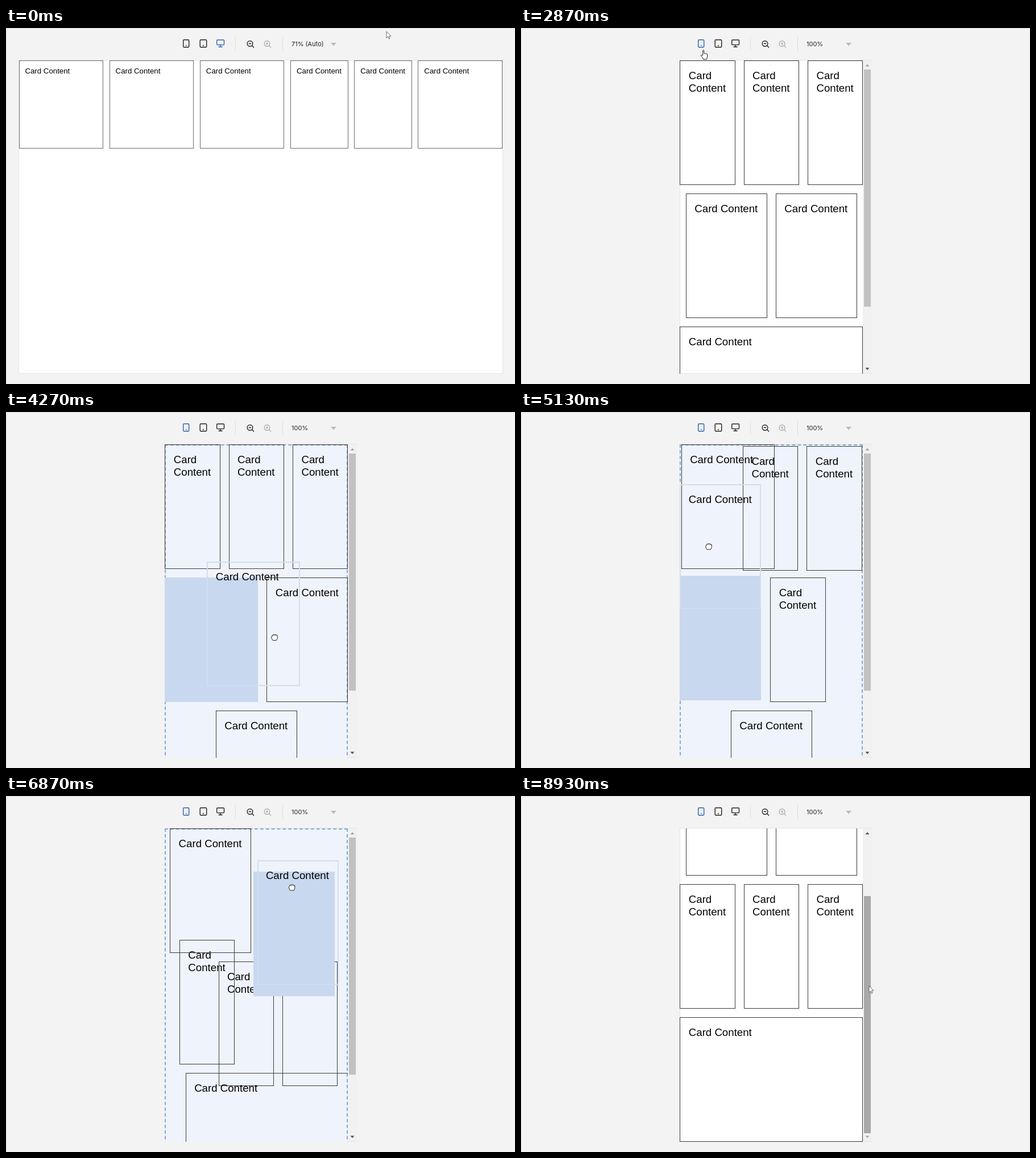
Animation, 895 px wide and 626 px high, one loop 9 s. Source, as an HTML page:

```html
<!DOCTYPE html>
<html lang="en">
<head>
<meta charset="utf-8">
<title>Responsive cards</title>
<style>
html, body { margin: 0; width: 100%; height: 100%; overflow: hidden; background: #f3f3f3; }
#stage { position: absolute; left: 0; top: 0; width: 895px; height: 626px; overflow: hidden; background: #f3f3f3; }
#stage * { box-sizing: border-box; }
#edge { position: absolute; inset: 0; border: solid #dfdfdf; border-width: 1px 0 0 1px; }
svg { position: absolute; left: 0; top: 0; overflow: visible; }
#zoom { position: absolute; left: 502px; top: 20px; font: 11px/16px Inter, sans-serif; color: #222; white-space: nowrap; }
#frame { position: absolute; top: 56px; height: 552px; background: #fff; border: 1px solid #e4e4e4; }
#view { position: absolute; top: 57px; height: 551px; overflow: hidden; }
#zone { position: absolute; left: 0; top: 0; width: 322px; height: 687px; background: #eff3fb; }
#dash { position: absolute; inset: 0; border: 2px dashed #82a9da; }
.card { position: absolute; border: 1px solid #3a3a3a; font-family: "Liberation Sans", Arial, sans-serif; color: #000; }
.card span { display: block; }
#ghost { border-color: #d0dfee; border-width: 2px; }
#pick { position: absolute; border: 2px solid #86abd8; }
#menu { position: absolute; width: 139px; height: 34px; border-radius: 6px; background: #1a1a1a; color: #ddd; }
#menu b { position: absolute; left: 34px; top: 9px; font: 600 11px/16px Inter, sans-serif; }
#bar { position: absolute; left: 601px; top: 57px; width: 16px; height: 550px; background: #f1f1f1; }
#thumb { position: absolute; left: 2px; width: 12px; height: 417px; }
</style>
</head>
<body>
<div id="stage">
  <div id="edge"></div>
  <svg id="tools" width="895" height="56" fill="none" stroke="#222" stroke-width="1.4">
    <g id="phone"><rect x="311.7" y="20.7" width="10" height="13" rx="1.5"/><path d="M316 31h1.5"/></g>
    <g id="tablet"><rect x="341.2" y="20.7" width="11.5" height="13" rx="1.5"/><path d="M346 31h2"/></g>
    <g id="desktop"><rect x="370.7" y="21" width="12.8" height="8.6" rx="1"/><path d="M377 30v3M373.6 33.2h7"/></g>
    <path d="M403.5 16v24M486.5 16v24" stroke="#dcdcdc" stroke-width="1"/>
    <g><circle cx="429" cy="27.5" r="4.8"/><path d="M432.6 31l3.4 3.6M426.8 27.5h4.4"/></g>
    <g stroke="#b0b0b0"><circle cx="459" cy="27.5" r="4.8"/><path d="M462.6 31l3.4 3.6M456.8 27.5h4.4M459 25.3v4.4"/></g>
    <path d="M571 26h10l-5 5.4z" fill="#b9b9b9" stroke="none"/>
  </svg>
  <div id="zoom"></div>
  <div id="frame"></div>
  <div id="view"><div id="zone"><div id="dash"></div></div></div>
  <div id="bar">
    <div id="thumb"></div>
    <svg width="16" height="550"><path id="up" d="M4.5 10.5h7L8 6.5z"/><path id="down" d="M4.5 540.5h7L8 544.5z"/></svg>
  </div>
  <div id="pick"></div>
  <div id="menu">
    <b>Card</b>
    <svg width="139" height="34" fill="none" stroke="#d0d0d0" stroke-width="1.2">
      <path d="M14.5 15l3-3.5 3 3.5M17.5 12v8q0 2 2 2h4"/>
      <path d="M70.5 4v26" stroke="#555"/>
      <rect x="87.5" y="14.5" width="9" height="9" rx="1.5"/>
      <path d="M85.5 19.5h-1.5q-1 0-1-1v-7q0-1 1-1h7.5q1 0 1 1v1.5"/>
      <path d="M114 13.5h12M117.5 13.5v-2h5v2M115.5 13.5l.6 10h7.8l.6-10M118.500 16v5M121.5 16v5"/>
    </svg>
  </div>
  <svg width="895" height="626"><path id="cursor" fill="#fff" stroke-linejoin="round"/></svg>
</div>
<script>
const LOOP = 9000, TOP = 57, ROW = 219, GAP = 15, FLIP = 200, BLUE = '#2b62b5';
const $ = id => document.getElementById(id);
const clamp = v => Math.max(0, Math.min(1, v));
const mix = (a, b, k) => a + (b - a) * k;
const px = v => v + 'px';

const devices = {
  desktop: { x: 22.5, w: 850.5, s: .71, line: '#6c6c6c' },
  tablet: { x: 88, w: 720, s: 1, line: '#3a3a3a' },
  phone: { x: 279.4, w: 322, s: 1, line: '#3a3a3a' }
};

// Each drag: card, press, reorder and drop times, resulting order.
const drags = [
  { card: 'F', from: 3170, swap: 3462, drop: 3760, order: 'ABFCDE' },
  { card: 'C', from: 4080, swap: 4390, drop: 4560, order: 'ABFDCE' },
  { card: 'D', from: 4900, swap: 5130, drop: 5400, order: 'DABFCE' },
  { card: 'F', from: 5650, swap: 5780, drop: 6000, order: 'DABCFE' },
  { card: 'E', from: 6500, swap: 6780, drop: 7050, order: 'DEABCF' },
  { card: 'D', from: 7250, swap: 7400, drop: 7600, order: 'EDABCF' }
];

// time, x, y
const path = [
  [0, 669, 6], [250, 535, 62], [560, 349, 30], [1650, 349, 30], [1920, 321, 29], [2850, 321, 29],
  [3130, 301, 592], [3170, 301, 592], [3600, 401, 175], [3760, 470, 165], [4060, 398, 424],
  [4090, 398, 424], [4270, 472, 396], [4450, 552, 400], [4560, 556, 400], [4870, 330, 400],
  [4910, 330, 400], [5250, 330, 172], [5400, 330, 168], [5630, 430, 396], [5660, 430, 396],
  [5920, 532, 401], [6120, 532, 401], [6470, 430, 572], [6510, 430, 572], [6940, 508, 130],
  [7050, 508, 128], [7230, 301, 196], [7260, 301, 196], [7540, 458, 195], [7780, 458, 195],
  [8130, 660, 255], [8420, 612, 231], [8480, 612, 231], [8860, 612, 334], [9000, 612, 334]
];

const shapes = {
  arrow: 'M0 0V11.5L2.6 9 4.4 13.2 6.2 12.4 4.5 8.3H8Z',
  point: 'M-1 10V1.5Q0 0 1 1.5V6.5Q2.3 5.6 3.2 7Q4.5 6.2 5.3 7.6Q7 7 7 9V12Q7 14 5.5 17H0Q-1 14-4 11Q-4.5 9-2.8 9.5Z',
  open: 'M-3 6Q-4 3-6.5 0Q-6-1.7-4.2-.2L-5-4.5Q-4-6-3-4.5L-2-1.5-1.8-6Q-.8-7.2.2-6L.4-1.5 1.4-5.7Q2.6-6.7 3.4-5.2L3-1 4.6-3.6Q6-4.3 6.4-2.8Q5.6 2 4 6Z',
  fist: 'M-3 5.5Q-5.5 2-5.3-1Q-4.6-2.4-3.6-1.6V-3.6Q-2.4-5-1-4.2Q.4-5.4 1.6-4.2Q3-5 4-3.4Q5.6-3.4 5.4-1.2Q5.5 3 3.6 5.5ZM-1-4V-2.5M1.6-4V-2.5M4-3.2V-2'
};

// Wrapping rows: D and E keep their width, the others share the free space.
function flow(order, { w, s }) {
  const full = w / s, out = {}, rows = [[]];
  const fixed = c => 'DE'.includes(c);
  const base = c => fixed(c) ? 143 : 97;
  const used = row => row.reduce((n, c) => n + base(c) + GAP, -GAP);
  for (const c of order) {
    if (used([...rows.at(-1), c]) > full) rows.push([]);
    rows.at(-1).push(c);
  }
  rows.forEach((row, i) => {
    const free = full - used(row), grow = row.filter(c => !fixed(c)).length;
    let x = grow ? 0 : free / 2;
    for (const c of row) {
      const cw = base(c) + (fixed(c) ? 0 : free / grow);
      out[c] = { x: x * s, y: i * (ROW + GAP) * s, w: cw * s };
      x += cw + GAP;
    }
  });
  return out;
}

function makeCard(id) {
  const el = document.createElement('div');
  el.className = 'card';
  el.id = id;
  el.innerHTML = '<span>Card Content</span>';
  $('view').append(el);
  return el;
}
const cards = Object.fromEntries([...'ABCDEF'].map(c => [c, makeCard(c)]));
const ghost = makeCard('ghost');

function place(el, { x, y, w }, s = 1) {
  const line = el === ghost ? 2 : 1;
  Object.assign(el.style, {
    left: px(x), top: px(y), width: px(w), height: px(ROW * s),
    padding: `${16 * s - line}px ${8 * s - line}px 0 ${15.4 * s - line}px`,
    fontSize: px(18.67 * s), lineHeight: px(21.7 * s)
  });
}

const show = (el, on) => el.style.display = on ? 'block' : 'none';

function pointer(t) {
  const i = Math.max(1, path.findIndex(p => p[0] > t));
  const [a, b] = [path[i - 1], path[i]];
  const p = clamp((t - a[0]) / (b[0] - a[0]));
  const k = p * p * (3 - 2 * p);
  return [mix(a[1], b[1], k), mix(a[2], b[2], k)];
}

function render(t) {
  const name = t < 960 ? 'desktop' : t < 2100 ? 'tablet' : 'phone';
  const dev = devices[name], mobile = name === 'phone';
  const [mx, my] = pointer(t);
  const n = drags.findLastIndex(d => t >= d.from);
  const drag = drags[n];
  const before = flow(n > 0 ? drags[n - 1].order : 'ABCDEF', dev);
  const after = drag && t >= drag.swap ? flow(drag.order, dev) : before;
  const held = !!drag && t < drag.drop;
  const since = drag ? t - drag.drop : LOOP;
  const fade = held ? 1 : clamp(1 - since / 150);
  const move = drag ? 1 - (1 - clamp((t - drag.swap) / FLIP)) ** 3 : 1;
  const scroll = t > 8450 ? clamp((my - 231) / 103) : 0;

  // toolbar
  const onIcon = my < 44 && mx < 358;
  const hover = !onIcon ? '' : mx > 337 ? 'tablet' : mx < 328 ? 'phone' : '';
  for (const id in devices) $(id).style.stroke = id === name || id === hover ? BLUE : '#222';
  $('zoom').textContent = name === 'desktop' ? '71% (Auto)' : '100%';

  // canvas
  $('frame').style.left = px(dev.x - .5);
  $('frame').style.width = px(dev.w + (mobile ? 16.5 : 1));
  $('view').style.left = px(dev.x);
  $('view').style.width = px(dev.w);
  show($('bar'), mobile);
  $('thumb').style.top = px(16 + 103 * scroll);
  $('thumb').style.background = t > 8450 ? '#a8a8a8' : '#c1c1c1';
  $('up').style.fill = scroll > 0 ? '#505050' : '#a3a3a3';
  $('down').style.fill = scroll < 1 ? '#505050' : '#a3a3a3';

  // drop zone
  $('zone').style.opacity = held ? 1 : clamp((350 - since) / 200);
  $('dash').style.opacity = fade;

  // cards
  for (const c in cards) {
    const el = cards[c], to = after[c], was = before[c];
    place(el, { x: mix(was.x, to.x, move), y: mix(was.y, to.y, move) - 136 * scroll, w: to.w }, dev.s);
    const tint = drag && drag.card === c ? fade : 0;
    el.style.background = `rgba(200,216,238,${tint})`;
    el.style.borderColor = tint ? 'rgb(200,216,238)' : dev.line;
    el.firstChild.style.opacity = held && tint ? 0 : 1 - tint * .5;
  }

  // dragged copy
  show(ghost, held);
  if (held) {
    const [gx, gy] = pointer(drag.from), o = before[drag.card];
    place(ghost, { x: o.x + mx - gx, y: o.y + my - gy, w: after[drag.card].w });
  }

  // selection left at the old slot
  const picked = !!drag && !held && since < 350;
  show($('pick'), picked);
  show($('menu'), picked);
  if (picked) {
    const o = before[drag.card], x = dev.x + o.x, y = TOP + o.y;
    Object.assign($('pick').style, { left: px(x), top: px(y), width: px(o.w), height: px(Math.min(ROW, 608 - y)) });
    $('menu').style.left = px(Math.round(Math.max(297, x + o.w - 146.5)));
    $('menu').style.top = px(y > 100 ? y - 41 : y + 7);
  }

  // cursor
  const inside = mobile && mx > 279 && mx < 601 && my > TOP;
  const kind = held ? 'fist' : onIcon ? 'point' : inside ? 'open' : 'arrow';
  $('cursor').setAttribute('d', shapes[kind]);
  $('cursor').setAttribute('stroke', kind === 'arrow' ? '#666' : '#222');
  $('cursor').setAttribute('transform', `translate(${mx} ${my})`);
}

const start = performance.now();
function tick() {
  render((performance.now() - start) % LOOP);
  requestAnimationFrame(tick);
}
tick();
</script>
</body>
</html>
```
